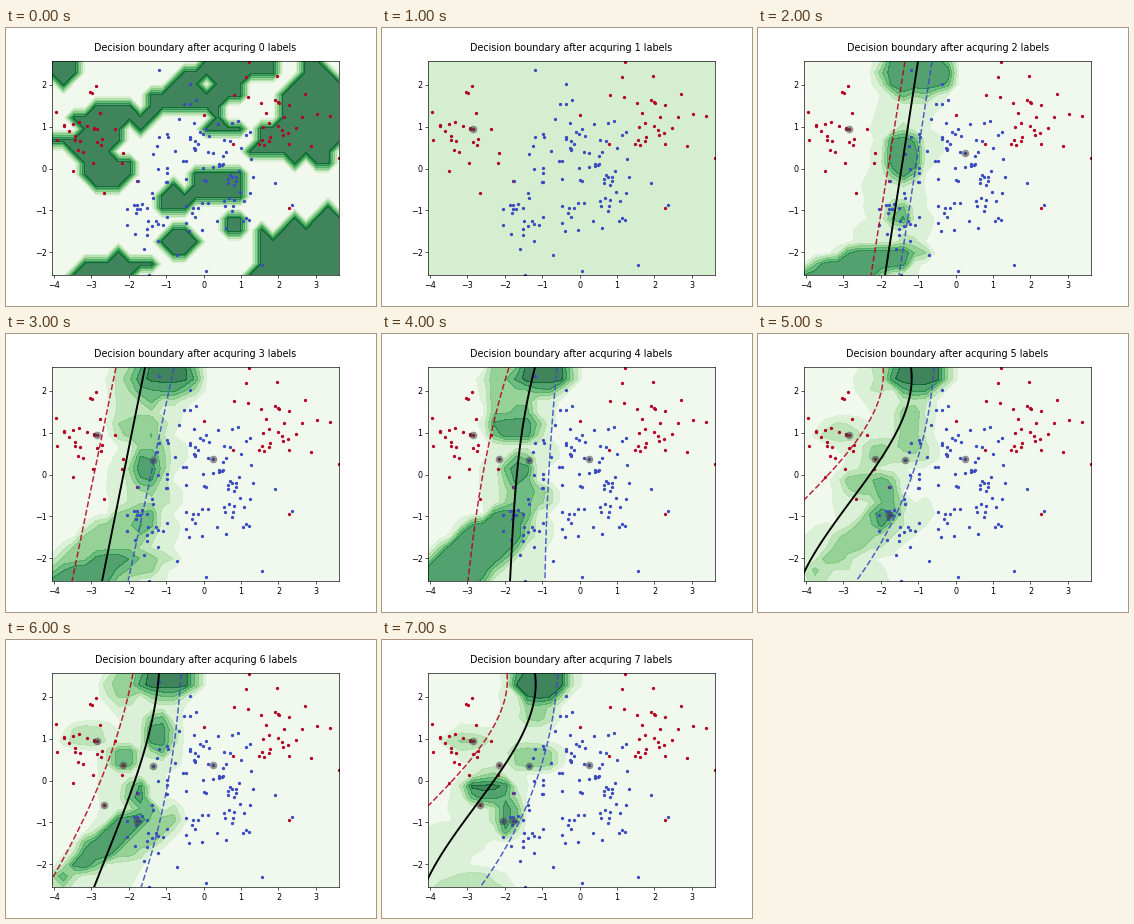
Animation of 370x278 px, one loop 8 s. Source, as a matplotlib script:

```python
import matplotlib.pyplot as plt
import numpy as np
from matplotlib.animation import FuncAnimation

W, H, DPI = 370, 278, 64
PT = 72 / DPI                      # points per pixel
LEFT, RIGHT, TOP, BOTTOM = 46.25, 333, 33.4, 247.4
RED, BLUE = "#b40426", "#3b4cc0"
LEVELS = np.linspace(0, 1, 8)

# The coarse grid gives the contours their angular look.
gx, gy = np.meshgrid(np.linspace(LEFT, RIGHT, 27), np.linspace(TOP, BOTTOM, 20))
rng = np.random.default_rng(7)
rough = rng.uniform(-1, 1, gx.shape)
soft = sum(np.roll(rough, s, a) for s in (-1, 0, 1) for a in (0, 1)) / 4


def radius(x, y, rx, ry, angle=0):
    """Distance from an ellipse's centre, equal to 1 on its rim."""
    c, s = np.cos(np.radians(angle)), np.sin(np.radians(angle))
    u, v = gx - x, gy - y
    return np.hypot((u * c + v * s) / rx, (v * c - u * s) / ry)


def hill(peak, x, y, rx, ry, angle=0):
    """Flat-topped hill with a ragged rim."""
    rim = (radius(x, y, rx, ry, angle) + .12 * rough - 1) * np.sqrt(rx * ry)
    return peak * np.clip(1 - rim / 13, 0, 1)


def islands(*ellipses):
    inside = [radius(*e) + .22 * rough < 1 for e in ellipses]
    return np.where(np.any(inside, axis=0), .95, .04)


def curve(xs, y):
    """Polynomial through x positions spread evenly from top to bottom."""
    t = (y - TOP) / (BOTTOM - TOP)
    return np.polyval(np.polyfit(np.linspace(0, 1, len(xs)), xs, len(xs) - 1), t)


# Red margin, boundary and blue margin for each number of labels.
CURVES = {
    2: [(147, 113), (160, 127), (174, 141)],
    3: [(110, 66), (139, 96), (168, 122)],
    4: [(127, 108, 95, 86), (153, 139, 132, 128), (175, 169, 165, 163)],
    6: [(127, 108, 79, 41), (153, 140, 116, 88), (175, 168, 155, 135)],
    7: [(125, 100, 36, -30), (153, 135, 86, 42), (176, 165, 140, 98)],
}
CURVES[5] = CURVES[7]


def landscape(count, *hills):
    gap = gx - curve(CURVES[count][1], gy)
    halo = .04 + .17 * np.exp(-(gap / 48) ** 2) * (1 + .45 * soft)
    return np.maximum.reduce([halo, *(hill(*h) for h in hills)])


start = islands(
    (56, 40, 20, 15), (106, 88, 40, 19), (82, 114, 34, 14), (104, 142, 32, 19),
    (190, 70, 42, 15), (230, 42, 46, 16), (308, 85, 36, 50), (272, 112, 34, 18),
    (172, 172, 20, 18), (172, 214, 21, 20), (216, 154, 30, 18), (215, 100, 20, 10),
    (228, 194, 18, 12), (290, 240, 47, 50), (325, 215, 26, 34), (100, 241, 46, 15, -8))

two = landscape(
    2, (.85, 158, 44, 30, 20), (.85, 145, 128, 14, 19), (.75, 142, 188, 6, 6),
    (.85, 98, 238, 54, 13, -14))

four = landscape(
    4, (.95, 160, 39, 22, 14), (.55, 128, 58, 20, 30), (.8, 133, 92, 20, 12),
    (.8, 136, 138, 10, 12), (.6, 143, 163, 18, 7), (.85, 92, 220, 60, 24, -38))

six = landscape(
    6, (.95, 160, 38, 23, 14), (.45, 118, 46, 14, 16), (.8, 153, 95, 9, 14),
    (.4, 82, 96, 16, 7), (.7, 118, 118, 9, 7), (.85, 131, 153, 5, 7),
    (.85, 103, 200, 44, 11, -38), (.5, 134, 196, 38, 14, -30), (.7, 57, 239, 5, 4))

seven = landscape(
    7, (.95, 158, 38, 22, 18), (.5, 156, 72, 10, 10), (.55, 152, 118, 18, 9),
    (.45, 85, 101, 14, 7), (.9, 106, 148, 17, 9), (.8, 125, 174, 8, 15),
    (.36, 85, 243, 36, 7))

FIELDS = [start, None, two, (two + four) / 2, four, (six + seven) / 2, six, seven]


def cluster(n, x, y, sx, sy):
    return rng.normal((x, y), (sx, sy), (n, 2))


queried = np.array([(90.5, 101), (206.5, 124.5), (147, 126), (116.5, 125),
                    (131, 181), (98, 165), (120.5, 181)])
is_red = np.array([1, 0, 0, 1, 0, 1, 0], bool)

red_dots = np.vstack([queried[is_red], cluster(32, 84, 105, 27, 30),
                      cluster(31, 264, 90, 24, 25),
                      [(324, 87.5), (333, 129.5), (283, 180)]])
blue_dots = np.vstack([queried[~is_red], cluster(28, 148, 184, 19, 19),
                       cluster(42, 190, 130, 19, 32), cluster(38, 236, 152, 20, 33),
                       [(153, 42), (143, 247), (199.5, 243)]])

fig = plt.figure(figsize=(W / DPI, H / DPI), dpi=DPI, facecolor="white")
ax = fig.add_axes([LEFT / W, 1 - BOTTOM / H, (RIGHT - LEFT) / W, (BOTTOM - TOP) / H])


def dots(points, size, color, **kw):
    ax.plot(*points.T, "o", ms=size * PT, mew=0, color=color, **kw)


def style_axes(count):
    ax.clear()
    ax.set(xlim=(LEFT, RIGHT), ylim=(BOTTOM, TOP))
    for axis, zero, unit, values in ((ax.xaxis, 197.65, 37.4, range(-4, 4)),
                                     (ax.yaxis, 140.5, -41.8, range(-2, 3))):
        axis.set_ticks([zero + unit * v for v in values],
                       [str(v).replace("-", "−") for v in values])
    ax.tick_params(labelsize=8.03 * PT, length=2.8 * PT, width=.64 * PT, pad=2.8 * PT)
    for spine in ax.spines.values():
        spine.set_linewidth(.64 * PT)
    ax.set_title(f"Decision boundary after acquring {count} labels",
                 fontsize=9.63 * PT, pad=10.2 * PT)


def draw_field(z):
    if z is None:
        ax.set_facecolor("#d5eed0")
        return
    ax.set_facecolor("white")
    ax.contourf(gx, gy, z, LEVELS, cmap="Greens", alpha=.75, zorder=0)
    ax.contour(gx, gy, z, LEVELS[1:-1], cmap="Greens", vmin=0, vmax=1,
               alpha=.6, linewidths=.6 * PT, zorder=.5)


def draw_curves(curves):
    y = np.linspace(TOP, BOTTOM, 120)
    for xs, color in zip(curves, (RED, "black", BLUE)):
        solid = color == "black"
        ax.plot(curve(xs, y), y, color=color, zorder=3, alpha=1 if solid else .88,
                lw=(1.9 if solid else 1.5) * PT, ls="-" if solid else (0, (4, 1.7)))


def draw(count):
    style_axes(count)
    draw_field(FIELDS[count])
    dots(red_dots, 3.3, RED, zorder=2)
    dots(blue_dots, 3.3, BLUE, zorder=2)
    dots(queried[:count], 7.6, "#404048", alpha=.55, zorder=2.5)
    draw_curves(CURVES.get(count, []))
    return []


anim = FuncAnimation(fig, draw, frames=8, interval=1000, init_func=lambda: [],
                     repeat=True, repeat_delay=0, blit=False)
plt.show()
```
